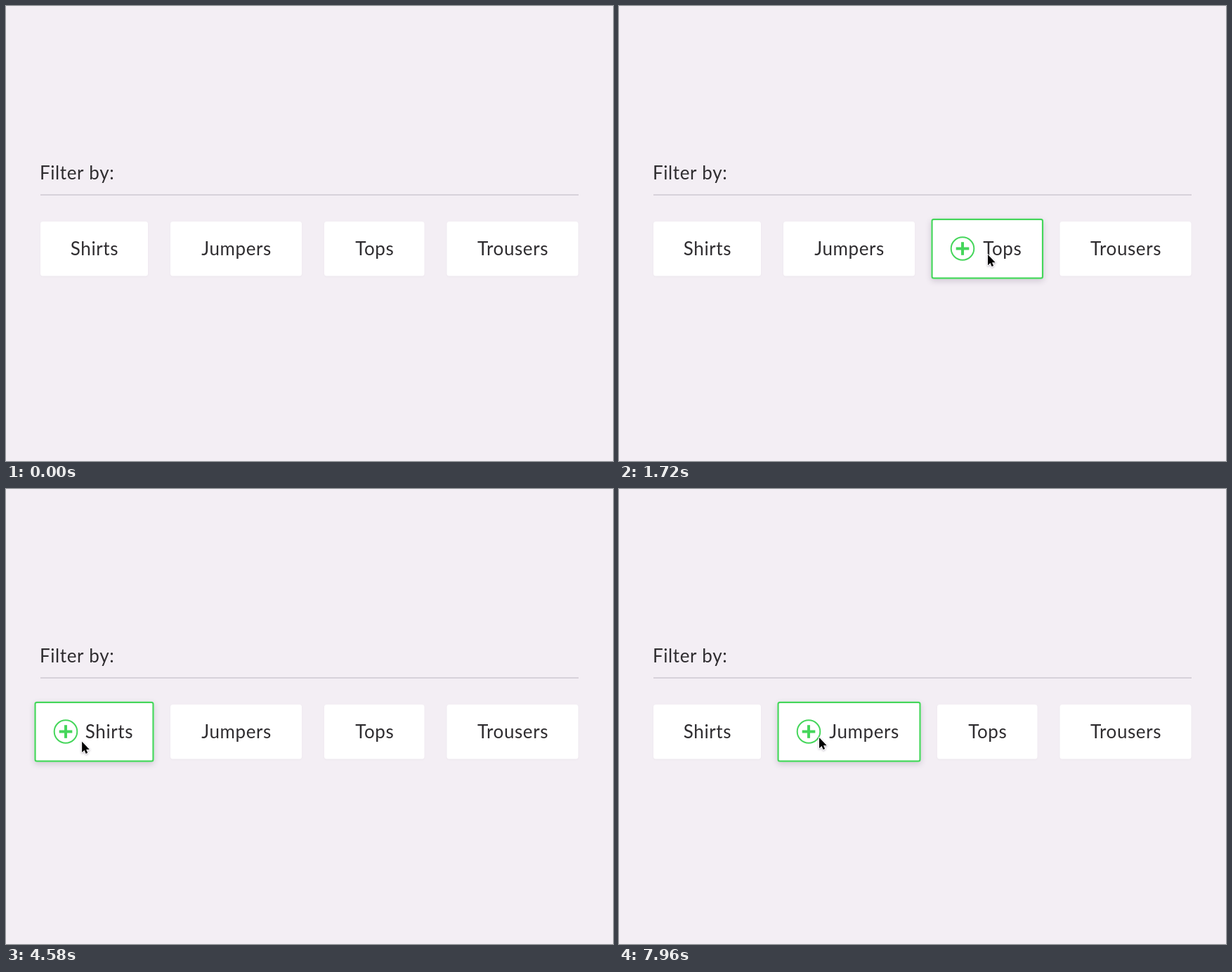
These frames come from a looping animation (864x648 px, 8 s). An HTML page with a canvas:

```html
<!DOCTYPE html>
<html lang="en">
<head>
<meta charset="utf-8">
<title>Filter buttons</title>
<style>
html, body { margin: 0; width: 100%; height: 100%; overflow: hidden; background: #f3eef4; }
canvas { display: block; }
</style>
</head>
<body>
<canvas id="stage" width="864" height="648"></canvas>
<script>
const ctx = document.getElementById('stage').getContext('2d');
const LOOP = 8000, FADE = 300, EXIT = 190, CLICK = 200;
const LEFT = 49, RIGHT = 815, GAP = 32, TOP = 307, HEIGHT = 77.5, REST_Y = 354;
const INK = [47, 45, 48], GREEN = [69, 214, 91], WHITE = [255, 255, 255];
const SELECT = 6110, DESELECT = 7750;

// "aim" is where the cursor rests, measured from the button's left edge
const shirts = { label: 'Shirts', w: 153, aim: 37 };
const jumpers = { label: 'Jumpers', w: 187, aim: 51 };
const tops = { label: 'Tops', w: 142.5, aim: 72 };
const trousers = { label: 'Trousers', w: 187, aim: 111 };
const buttons = [shirts, jumpers, tops, trousers];
buttons.reduce((x, b) => (b.x = x) + b.w + GAP, LEFT);

// Each trip dips below the row by "sag" pixels
const tour = [
  { to: trousers, depart: 60, arrive: 640, sag: 0 },
  { to: tops, depart: 780, arrive: 1720, sag: 82 },
  { to: jumpers, depart: 1960, arrive: 2760, sag: 53 },
  { to: shirts, depart: 3100, arrive: 3880, sag: 40 },
  { to: jumpers, depart: 4420, arrive: 5480, sag: 105 }
];
tour.forEach((trip, i) => {
  const next = tour[i + 1];
  trip.from = i ? tour[i - 1].to.x + tour[i - 1].to.aim : 862;
  trip.on = trip.arrive - FADE;
  trip.off = next ? next.depart + EXIT : Infinity;
});

const clamp = v => Math.max(0, Math.min(1, v));
const lerp = (a, b, k) => a + (b - a) * k;
const mix = (a, b, k) => `rgb(${a.map((v, i) => Math.round(lerp(v, b[i], k)))})`;
const rgb = c => `rgb(${c})`;
const cubic = t => t < 0.5 ? 4 * t ** 3 : 1 - 4 * (1 - t) ** 3;

// Timing curve with the meaning of CSS cubic-bezier()
function timing(x1, y1, x2, y2) {
  const at = (a, b, s) => 3 * a * s * (1 - s) ** 2 + 3 * b * s * s * (1 - s) + s ** 3;
  return x => {
    if (x <= 0 || x >= 1) return clamp(x);
    let lo = 0, hi = 1;
    for (let i = 0; i < 20; i++) {
      const mid = (lo + hi) / 2;
      if (at(x1, x2, mid) < x) lo = mid; else hi = mid;
    }
    return at(y1, y2, lo);
  };
}
const ease = timing(0.25, 0.1, 0.25, 1);
const glide = timing(0.3, 0, 0.45, 1.3);

const toggle = (t, on, off, duration) =>
  t < off ? ease((t - on) / duration) : 1 - ease((t - off) / duration);

function box(x, y, w, h, r) {
  ctx.beginPath();
  ctx.roundRect(x, y, w, h, r);
}

function shadow(alpha, blur, dy) {
  ctx.shadowColor = `rgba(70, 50, 85, ${alpha})`;
  ctx.shadowBlur = blur;
  ctx.shadowOffsetY = dy;
}

function drawIcon(x, y, color, turn) {
  ctx.save();
  ctx.translate(x, y);
  ctx.rotate(turn);
  ctx.strokeStyle = ctx.fillStyle = color;
  ctx.lineWidth = 2;
  ctx.beginPath();
  ctx.arc(0, 0, 16.3, 0, Math.PI * 2);
  ctx.stroke();
  ctx.fillRect(-9.3, -2, 18.6, 4);
  ctx.fillRect(-2, -9.3, 4, 18.6);
  ctx.restore();
}

function drawButton(b, t) {
  const visit = tour.find(v => v.to === b && t >= v.on && t < v.off + FADE);
  const k = visit ? toggle(t, visit.on, visit.off, FADE) : 0;
  const chosen = b === jumpers ? toggle(t, SELECT, DESELECT, CLICK) : 0;
  const grow = k ** 1.4, gx = 8.6 * grow, gy = 4.3 * grow;
  const x = b.x - gx, y = TOP - gy, w = b.w + 2 * gx, h = HEIGHT + 2 * gy;

  ctx.save();
  shadow(lerp(0.04, 0.2, k), lerp(3, 8, k), lerp(1, 3, k));
  ctx.fillStyle = mix(WHITE, GREEN, chosen);
  box(x, y, w, h, 3.5);
  ctx.fill();
  ctx.restore();

  ctx.save();
  ctx.globalAlpha = k;
  ctx.strokeStyle = rgb(GREEN);
  ctx.lineWidth = 2.2;
  box(x + 1.1, y + 1.1, w - 2.2, h - 2.2, 2.5);
  ctx.stroke();
  const slide = 10 * Math.sqrt(k * (1 - k));
  drawIcon(b.x + 36 + slide, 345.5, mix(GREEN, WHITE, chosen), chosen * Math.PI / 4);
  ctx.restore();

  ctx.fillStyle = mix(INK, WHITE, chosen);
  ctx.textAlign = 'center';
  ctx.fillText(b.label, b.x + b.w / 2 + 0.5 + 21 * k, 355);
}

const arrow = new Path2D('M0 0V15.3l3.5-3.2 2.1 5 2.5-1.1-2.1-4.8h4.7z');

function drawCursor(t) {
  const trip = tour.filter(v => t >= v.depart).pop();
  if (!trip) return;
  const p = clamp((t - trip.depart) / (trip.arrive - trip.depart));
  const s = cubic(p);
  ctx.save();
  ctx.translate(
    lerp(trip.from, trip.to.x + trip.to.aim, glide(p)),
    REST_Y + trip.sag * 4 * s * (1 - s)
  );
  ctx.lineJoin = 'round';
  ctx.lineWidth = 1.8;
  ctx.strokeStyle = '#fff';
  ctx.save();
  shadow(0.4, 3, 1);
  ctx.stroke(arrow);
  ctx.restore();
  ctx.fillStyle = '#000';
  ctx.fill(arrow);
  ctx.restore();
}

function draw(t) {
  ctx.fillStyle = '#f3eef4';
  ctx.fillRect(0, 0, 864, 648);
  ctx.font = '26px Lato, sans-serif';
  ctx.letterSpacing = '0.6px';
  ctx.textAlign = 'left';
  ctx.fillStyle = rgb(INK);
  ctx.fillText('Filter by:', 48, 247);
  ctx.fillStyle = '#d7d1da';
  ctx.fillRect(LEFT, 268, RIGHT - LEFT, 2);
  buttons.forEach(b => drawButton(b, t));
  drawCursor(t);
}

const begin = performance.now();
function tick() {
  draw((performance.now() - begin) % LOOP);
  requestAnimationFrame(tick);
}
tick();
</script>
</body>
</html>
```
